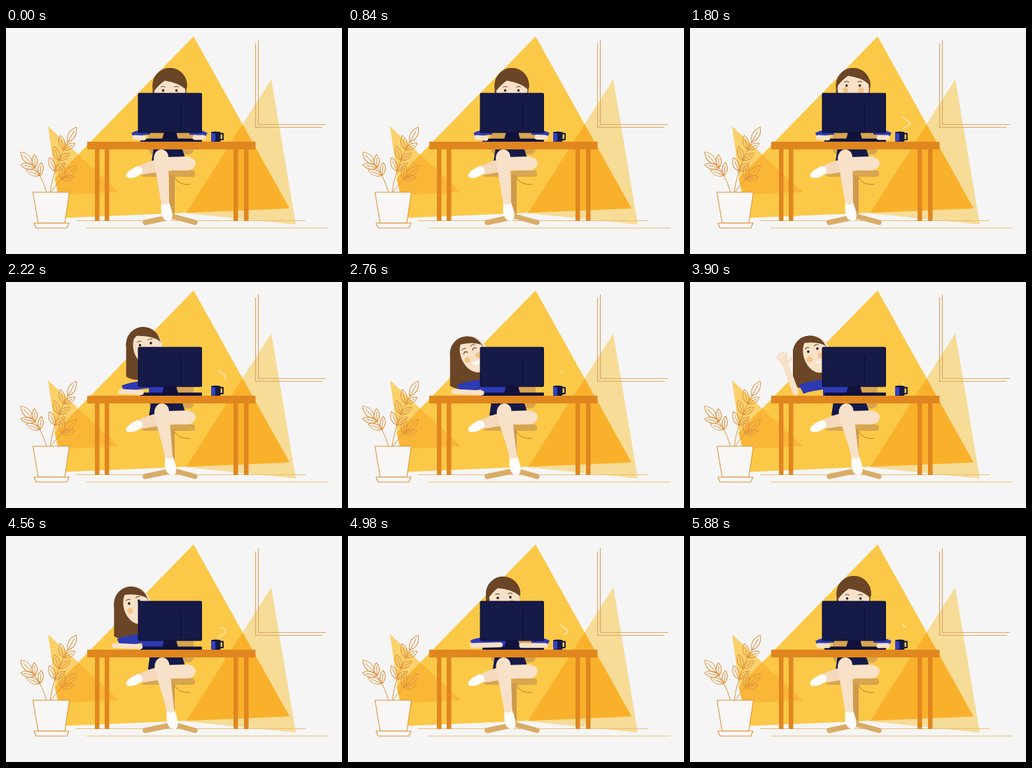
An HTML page with a canvas that plays this animation: 480x322 px, repeating every 5.94 s.

```html
<!DOCTYPE html>
<html lang="en">
<head>
<meta charset="utf-8">
<title>At the desk</title>
<style>
html, body { margin: 0; width: 100%; height: 100%; overflow: hidden; background: #f5f5f5; }
canvas { display: block; width: 480px; height: 322px; }
</style>
</head>
<body>
<canvas id="stage" width="480" height="322"></canvas>
<script>
const ctx = document.getElementById('stage').getContext('2d');
const LOOP = 5940, STEP = 60;
const C = {
  skin: '#f8e1c9', shade: '#f4d9bc', hair: '#6a4526', blue: '#2c3ab4', navy: '#151a47',
  deep: '#10123c', wood: '#e0861f', chair: '#d8a550', line: '#dd9440', white: '#fefdfb', pot: '#f8f7f5'
};

const mix = (a, b, u) => a + (b - a) * u;

function ramp(t, from, to) {
  const u = Math.min(1, Math.max(0, (t - from) / (to - from)));
  return u * u * (3 - 2 * u);
}

const pulse = (t, a, b, c, d) => ramp(t, a, b) - ramp(t, c, d);

function fill(color) { ctx.fillStyle = color; ctx.fill(); }

function shape(color, d) {
  ctx.fillStyle = color;
  ctx.fill(new Path2D(d));
}

function poly(color, ...p) {
  ctx.beginPath();
  for (let i = 0; i < p.length; i += 2) ctx.lineTo(p[i], p[i + 1]);
  ctx.closePath();
  fill(color);
}

function box(color, x, y, w, h, r = 0) {
  ctx.beginPath();
  ctx.roundRect(x, y, w, h, r);
  fill(color);
}

function oval(color, x, y, rx, ry = rx) {
  ctx.beginPath();
  ctx.ellipse(x, y, rx, ry, 0, 0, Math.PI * 2);
  fill(color);
}

function stroke(color, width, d, cap = 'round') {
  ctx.strokeStyle = color;
  ctx.lineWidth = width;
  ctx.lineCap = cap;
  ctx.lineJoin = cap === 'round' ? 'round' : 'miter';
  ctx.stroke(new Path2D(d));
}

function backdrop() {
  const right = [379, 73, 414, 280, 257, 264], left = [60, 140, 161, 234, 74, 238];
  ctx.fillStyle = '#f5f5f5';
  ctx.fillRect(0, 0, 480, 322);
  poly('#f6dc97', ...right);
  poly('#fbd16c', ...left);
  poly('#fbc947', 268, 12, 405, 257, 86, 270.5, 69, 215);
  ctx.save();
  ctx.clip();
  poly('#f9b12b', ...right);
  poly('#f9b637', ...left);
  ctx.restore();
  stroke('#dba863', 1.2, 'M356.5 22V141.5H452M360.5 17.5V137.5H457', 'butt');
  stroke('#efbd70', 1.2, 'M100 274.5H428M115 285H461', 'butt');
}

function leaf(x, y, angle, size) {
  ctx.save();
  ctx.translate(x, y);
  ctx.rotate(angle);
  stroke(C.line, 1, `M0 0Q${size / 2} ${-size * .4} ${size} 0Q${size / 2} ${size * .4} 0 0H${size * .75}`);
  ctx.restore();
}

// A curved stem with a leaf at its end and pairs of leaves below it.
function stem(x0, y0, cx, cy, x1, y1, pairs) {
  const along = (a, c, b, u) => mix(mix(a, c, u), mix(c, b, u), u);
  const heading = u => Math.atan2(mix(cy - y0, y1 - cy, u), mix(cx - x0, x1 - cx, u));
  stroke(C.line, 1, `M${x0} ${y0}Q${cx} ${cy} ${x1} ${y1}`);
  leaf(x1, y1, heading(1), 25);
  for (let i = 1; i <= pairs; i++) {
    const u = .2 + .65 * i / pairs, x = along(x0, cx, x1, u), y = along(y0, cy, y1, u);
    leaf(x, y, heading(u) - .7, 21);
    leaf(x, y, heading(u) + .6, 19);
  }
}

function plant() {
  stem(63, 234, 68, 198, 88, 163, 3);
  stem(58, 234, 50, 208, 38, 195, 2);
  stem(65, 233, 72, 222, 82, 213, 1);
  for (const d of ['M38.5 234H90.5L84 278H46Z', 'M40 278H90L87 285H43Z']) {
    shape(C.pot, d);
    stroke(C.line, 1.1, d);
  }
}

function chair() {
  box(C.chair, 204, 138, 64, 42, 7);
  box(C.chair, 194, 203, 76, 9, 4);
  box('#cf9a4c', 233, 210, 8, 58);
  stroke('#b98238', 1, 'M241 213Q246 224 263 223');
  stroke('#d9ac66', 7.5, 'M237 265V269L199 277M237 268L270 277');
}

function legs(lean) {
  const knee = 222 + 1.5 * lean, foot = 227.5 + 9 * lean, hem = 208 - 6 * lean;
  poly(C.navy, hem + 3, 170, 251, 170, 257, 188, 232, 194, hem, 190);
  shape(C.shade, 'M187 198Q200 191 216 187L250 190L262 202Q225 203 194 209Z');
  shape(C.skin, 'M226 184L258 183Q271 185 271 193Q270 202 258 203L230 202Z');
  shape(C.white, 'M187 197Q196 197 195 206Q184 216 173 213Q167 207 187 197Z');
  shape(C.skin, `M${knee - 11} 186C${knee - 10} 168 ${knee + 10} 170 ${knee + 10} 184
    L${foot + 5.5} 254H${foot - 5}C${foot - 10} 226 ${knee - 7} 210 ${knee - 11} 186Z`);
  shape(C.white, `M${foot - 5.5} 249Q${foot} 255 ${foot + 5.5} 249C${foot + 10} 260 ${foot + 13} 273 ${foot + 6} 275
    C${foot - 6} 275 ${foot - 7} 262 ${foot - 5.5} 249Z`);
}

function head(p) {
  const { lean, laugh } = p;
  const ey = 7.5 - 10 * p.look, ex = 5 * lean, gap = 9.5 - 2.6 * lean, low = 6.5 + 4.5 * lean;
  ctx.save();
  ctx.translate(p.headX, 81.5 + 19.5 * lean * lean + laugh);
  oval(C.hair, 0, 0, 24.5);
  shape(C.hair, 'M-24.5 0V46Q-6 58 20 40L24.5 0Z');
  ctx.rotate(-.32 * lean - .1 * laugh);
  oval(C.skin, 9 * lean, 5, 22.5 - 3 * lean, 27);
  for (const side of [-1, 1]) {
    const x = ex + side * gap;
    oval('#f4c585', x + side * 1.5, ey + low, 4.2);
    if (laugh > .5) stroke('#54351f', 1.2, `M${x - 3} ${ey + 1}q3 -4 6 0`);
    else oval('#2c211d', x, ey, 1.8);
    stroke(C.hair, 1, `M${x - 3} ${ey - 5}q3 -2 6 0`);
  }
  const w = lean * (4 + 3 * laugh);
  if (w > .3) shape('#fffdf9', `M${ex + 2 - w} ${ey + 17}q${w} 2 ${2 * w} 0q${-w} ${1.8 * w} ${-2 * w} 0Z`);
  // Fringe, parted left of the middle.
  ctx.beginPath();
  ctx.arc(0, 0, 24.6, Math.PI * .96, Math.PI * 2.04);
  ctx.lineTo(23.5, ey - 1);
  ctx.quadraticCurveTo(13, ey - 11, -7, ey - 14);
  ctx.quadraticCurveTo(-15, ey - 9, -23.5, ey + 2);
  ctx.closePath();
  fill(C.hair);
  ctx.restore();
}

function sleeves(p) {
  const { lean, reach } = p;
  const width = 8 + 6 * lean, cuff = 181 - 22 * lean, span = 25 + 23 * Math.max(lean, reach);
  box(C.blue, 226 - 36 * lean, 140, 18 + 22 * lean, 24);
  stroke(C.blue, width, `M${cuff} 153Q${cuff + 10} 148 ${cuff + span} ${148 - 4 * lean}`, 'butt');
  if (lean < .5) stroke(C.blue, width, 'M286 153Q276 148 262 148', 'butt');
}

function hand(x, y, turn, size) {
  ctx.save();
  ctx.translate(x, y);
  ctx.rotate(turn + Math.PI / 2);
  ctx.scale(size, size);
  oval(C.skin, 0, -6, 6, 7);
  for (let i = 0; i < 4; i++) {
    const a = (i - 1.6) * .27, long = 20 - Math.abs(i - 1.6) * 1.5;
    stroke(C.skin, 3.8, `M${Math.sin(a) * 8} -8L${Math.sin(a) * long} ${-Math.cos(a) * long}`);
  }
  stroke(C.skin, 4, 'M3 -3L11 -8');
  ctx.restore();
}

function arms(p, t) {
  const { lean, reach, raise } = p;
  const typing = lean ? 0 : Math.sin(t / 60) * .6;
  const turn = mix(.05, -1.93, raise) + raise * Math.sin((t - 3900) / 85) * .13;
  const size = (13 + 27 * Math.max(lean, reach)) * (1 - .5 * Math.sin(Math.PI * raise));
  const x0 = 184 - 33 * lean, y0 = 156 + raise;
  const x = x0 + Math.cos(turn) * size, y = y0 + Math.sin(turn) * size - 3 * reach + typing;
  stroke(C.skin, 7 + 2 * raise, `M${x0} ${y0}L${x} ${y}`);
  if (raise > .05) hand(x, y, turn, raise);
  if (lean < .5) stroke(C.skin, 7, `M282 156L${270 - 22 * reach} ${156 - typing}`);
}

function desk() {
  for (const x of [127, 141, 325, 340]) box(C.wood, x, 172, 6.5, 103);
  box(C.wood, 116, 162, 240.5, 11);
}

function monitor() {
  poly(C.deep, 226, 148, 243, 148, 246, 159, 223, 159);
  box(C.deep, 192, 157.5, 88, 4.5, 1);
  box(C.deep, 188.5, 92.5, 91.5, 57, 2);
  box(C.navy, 190, 94, 88.5, 54, 1);
  stroke('#0b0c30', 1, 'M249.5 106V146');
}

function cup() {
  stroke(C.deep, 1.8, 'M305 150.5H310V159H305');
  box(C.navy, 293, 148, 13.5, 14, 1.5);
  box('#3341c0', 293, 149, 6, 12.5, 1);
  oval(C.deep, 299.7, 148.8, 6.6, 1.3);
}

// A wisp that grows out of the cup, lifts off and shrinks, twice per loop.
function steam(t) {
  const u = t / (LOOP / 2) % 1;
  const top = 146 - 20 * ramp(u, .2, .65), end = 146 - 16 * ramp(u, .5, 1);
  if (end - top < .5) return;
  let d = '';
  for (let y = top; y <= end; y++) {
    d += `${d ? 'L' : 'M'}${309 - 5 * Math.cos((y - 126) * .33)} ${y}`;
  }
  stroke('rgba(255,246,222,.9)', 1.2, d);
}

function pose(t) {
  const lean = pulse(t, 1740, 2580, 4380, 5220);
  const laugh = pulse(t, 2400, 2640, 3060, 3300);
  return {
    lean, laugh,
    look: Math.max(.7 * pulse(t, 1200, 1700, 2600, 3000), lean),
    raise: pulse(t, 3100, 3420, 4260, 4560),
    reach: pulse(t, 4560, 4920, 5040, 5400),
    headX: 234 - 62.5 * lean - 1.2 * laugh
  };
}

function draw(t) {
  const p = pose(t);
  backdrop();
  plant();
  chair();
  legs(p.lean);
  head(p);
  sleeves(p);
  steam(t);
  monitor();
  arms(p, t);
  desk();
  cup();
}

const start = performance.now();
function frame(now) {
  const ms = Math.max(0, now - start) % LOOP;
  draw(Math.floor(ms / STEP) * STEP);
  requestAnimationFrame(frame);
}
draw(0);
requestAnimationFrame(frame);
</script>
</body>
</html>
```
